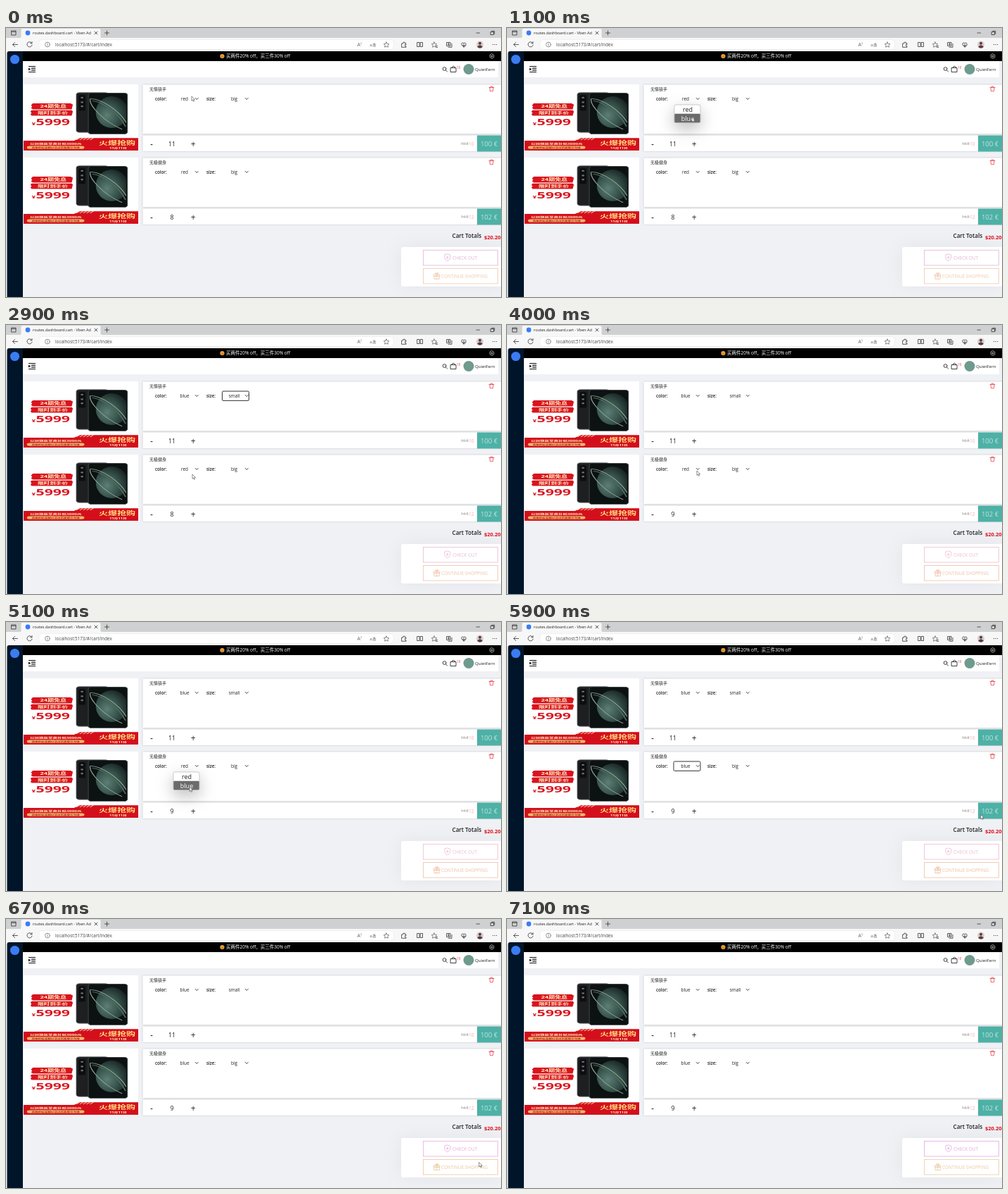
An HTML page for the animation above (7.4 s loop, 704 by 382 pixels).

```html
<!DOCTYPE html>
<html lang="zh-CN">
<head>
<meta charset="utf-8">
<title>Cart</title>
<style>
  html, body { margin: 0; width: 100%; height: 100%; overflow: hidden; }
  svg { display: block; width: 704px; height: 382px; }
  text { font: 6.4px "Open Sans", "Noto Sans CJK SC", "Noto Sans CJK", sans-serif; fill: #222; white-space: pre; }
  .mid { text-anchor: middle; }
  .bold { font-weight: 600; font-size: 6.2px; }
  .count { font-size: 8.8px; }
  .old { font-size: 5.4px; fill: #999; text-decoration: line-through; }
  .new { font-size: 6.6px; fill: #f4a9a9; }
  .price { font-size: 9.5px; font-weight: 300; fill: #fff; }
  .line { fill: none; stroke: #333; stroke-width: .8; stroke-linecap: round; stroke-linejoin: round; }
  .card { fill: #fff; filter: drop-shadow(0 .6px .8px #0003); }
  .ad text { font-weight: 700; fill: #fff0c0; }
  #menu text { font-size: 9px; }
  #panel { fill: #fff; filter: drop-shadow(0 8px 11px #0004); }
</style>
</head>
<body>
<svg viewBox="0 0 704 382">
  <defs>
    <radialGradient id="planet" cx=".35" cy=".6" r=".7">
      <stop offset="0" stop-color="#5d7f74"/>
      <stop offset=".5" stop-color="#38544e"/>
      <stop offset="1" stop-color="#16211f"/>
    </radialGradient>
    <clipPath id="screen"><rect x="57.5" y="14" width="32" height="60" rx="2"/></clipPath>
    <!-- Banner drawn on a 100 x 100 square, shown squashed as in the shop layout -->
    <g id="ad" class="ad" transform="translate(25 80) scale(1.63 .94)">
      <path fill="#fff" d="M0 0h100v100H0z"/>
      <rect x="46" y="12.5" width="28" height="60" rx="3" fill="#1d1f21" stroke="#66696b" stroke-width=".6"/>
      <rect x="48" y="16" width="6" height="24" rx="2" fill="#0d0e10"/>
      <path fill="none" stroke="#6d7276" stroke-width="2.4" stroke-linecap="round" d="M51 20v.1m0 7v.1m0 6v.1"/>
      <rect x="56.5" y="13" width="34" height="62" rx="3" fill="#0c1112" stroke="#3b4044" stroke-width=".7"/>
      <g clip-path="url(#screen)">
        <ellipse cx="77" cy="42" rx="14" ry="24" fill="url(#planet)"/>
        <path fill="none" stroke="#8fa88f" stroke-width=".8" d="M58 22C66 20 86 40 92 66M58 22C57 32 70 56 86 68"/>
        <path fill="none" stroke="#4c6a5c" stroke-width="1.2" d="M60 25C67 25 83 42 89 64"/>
      </g>
      <path fill="#d9141e" d="M8 28.7h33l2 2-1 7H8l-1.5-2 1-2-1-2zM7 39h35l1 2-1 6.3H7l-1-2 1-2-1-2z"/>
      <text class="mid" x="26" y="35.5" style="font-size:5.6px">24期免息</text>
      <text class="mid" x="25.5" y="45.2" style="font-size:5.3px">限时到手价</text>
      <text x="7" y="62" style="font-size:6px;fill:#d9141e">¥</text>
      <text x="10.8" y="62" style="font-size:13px;fill:#d9141e">5999</text>
      <path fill="#d40f1c" d="M0 85h44l5-4h51v19H0z"/>
      <path fill="none" stroke="#f5c8a8" stroke-width=".8" d="M46 84l3-3m0 3l3-3m0 3l3-3m0 3l3-3m0 3l3-3"/>
      <text x="5.5" y="91.6" style="font-size:4px">以旧换新至高补贴3000元</text>
      <rect x="3" y="93" width="50" height="4.6" rx="2" fill="#f0b56a"/>
      <text class="mid" x="28" y="96.4" style="font-size:2.8px;fill:#9d1a12">具体补贴金额以活动页面展示为准</text>
      <text x="65.6" y="91.3" style="font-size:8px;fill:#ffdc80">火爆抢购</text>
      <text x="74.8" y="97.6" style="font-size:3.6px">11月11日</text>
    </g>
    <g id="row">
      <use href="#ad"/>
      <path class="card" d="M194.5 80.5H704V150H194.5z"/>
      <path class="card" d="M194.5 152.5H704v22.500H194.5z"/>
      <path fill="#4eb1a6" d="M670 152.5h34v23h-34z"/>
      <text class="bold" x="212" y="103.2">color:</text>
      <text class="bold" x="285" y="103.2">size:</text>
      <path class="line" style="stroke:#111" d="M269.3 99.5l2 2 2-2M340.3 99.5l2 2 2-2"/>
      <path class="line" style="stroke:#e2444d" d="M687 84.5h7M689 84.3v-1.2h3v1.2M688 84.8l.5 5h4l.5-5"/>
      <text class="mid" x="207" y="168.6" style="font-size:11px;font-weight:600">-</text>
      <text class="mid" x="266.3" y="169.2" style="font-size:12px">+</text>
    </g>
  </defs>

  <!-- Browser -->
  <path fill="#f7f7f8" d="M0 0h704v382H0z"/>
  <path fill="#cfd0d1" d="M0 0h704v14H0z"/>
  <path fill="#f7f7f8" d="M20 14c1 0 1.5-1 1.5-2V3q0-2 2-2h109q2 0 2 2v9c0 1 .5 2 1.5 2z"/>
  <rect x="47" y="16.5" width="504" height="14" rx="4" fill="#fff" stroke="#e4e4e4" stroke-width=".5"/>
  <circle cx="31" cy="7" r="3.4" fill="#3b7cf5"/>
  <text x="38" y="9.2" style="font-size:5.5px">routes.dashboard.cart - Vben Ad</text>
  <text x="70" y="25.9" style="font-size:6.3px;fill:#444">localhost:5173/#/cart/index</text>
  <g class="line">
    <path d="M8 4h6v6H8zM8 5.3h6M126 5l4 4m0-4l-4 4M143.5 4v6m-3-3h6M669 7h4.5M689.5 5.5h4v4h-4zM690.7 4.3h4v4"/>
    <path d="M16.5 23.5h-7m3-3l-3 3 3 3M36.7 21.5a3.6 3.6 0 1 0 .4 2.6M37 19.5v2.3h-2.3"/>
    <circle cx="59" cy="23.5" r="3.4" stroke="#777"/>
    <path stroke="#777" d="M59 23v2m0-3.4v.1"/>
    <path id="star" stroke="#666" d="M541 20l1.2 2.4 2.6.4-1.9 1.8.5 2.6-2.4-1.2-2.4 1.2.5-2.6-1.9-1.8 2.6-.4z"/>
    <use href="#star" x="68"/>
    <path d="M611.5 25.5h2m-1.5 2h1.5M563 22h1.8a1.4 1.4 0 1 1 2.6 0h1.6v1.5a1.2 1.2 0 1 0 0 2.2v1.6h-6z"/>
    <path d="M585 20.5h3v6h-3zM589.5 20.5h3v6h-3zM627 20.5h5v5h-5zM629 27.3h5v-5M629.5 21.6v2.8m-1.4-1.4h2.8"/>
    <path d="M651 27l-3-3c-1-3 2-4 3-2 1-2 4-1 3 2zM651 23v4m-1.5-2h4"/>
  </g>
  <text x="499.5" y="25.8" style="font-size:7px;fill:#666">A<tspan dy="-2" style="font-size:4px">》</tspan></text>
  <text class="mid" x="522" y="25.6" style="font-size:6px;fill:#666">aあ</text>
  <circle cx="674" cy="23.5" r="5" fill="#d5cfcd"/>
  <path fill="#5b3a3b" d="M670 26.7q4-5 8 0-4 4-8 0z"/>
  <circle cx="674" cy="21.8" r="2" fill="#5b3a3b"/>
  <path class="line" style="stroke-width:1.2" d="M692.5 23.5h.1m2.4 0h.1m2.4 0h.1"/>

  <!-- Page frame -->
  <path fill="#eff1f5" d="M1 33h703v349H1z"/>
  <path fill="#001529" d="M1.5 382V36q0-3 3-3H24v349z"/>
  <path d="M24 33h680v14H24z"/>
  <path fill="#fff" d="M24 47h676v23H24z"/>
  <circle cx="12.5" cy="44.5" r="6.6" fill="#3b7cf5"/>
  <circle cx="307.5" cy="40" r="3.1" fill="#f2a33a"/>
  <path fill="none" stroke="#7a3c12" stroke-width=".7" d="M306 39h.6m1.8 0h.6m-3 1.8q1.5 1.3 3 0"/>
  <text x="313" y="42.4" style="font-size:6.5px;fill:#fff">买两件20% off，买三件30% off</text>
  <path class="line" style="stroke:#ddd;stroke-width:.7" d="M691 36.8l2.8 1.6v3.2l-2.8 1.6-2.8-1.6v-3.2zM690 40a1 1 0 1 0 2 0 1 1 0 1 0-2 0"/>
  <path class="line" style="stroke:#111;stroke-width:1.2" d="M32.5 54.5h9M36.5 57.2h5M36.5 59.8h5M32.5 62.5h9"/>
  <path d="M32 56.5l3 2-3 2z"/>
  <path class="line" style="stroke:#111" d="M626 58a2.4 2.4 0 1 1-4.8 0 2.4 2.4 0 0 1 4.8 0M625.4 59.8l2.2 2.2M632.5 56.5h7.5v6h-7.5zM634.4 56.3q0-2 1.9-2t1.9 2"/>
  <text x="641" y="57.8" style="font-size:4.6px;fill:#e33">10</text>
  <circle cx="658" cy="58.5" r="7.5" fill="#6f9a8e"/>
  <text x="667" y="61" style="font-size:6.1px">QuietFern</text>

  <!-- Cart rows -->
  <use href="#row"/>
  <use href="#row" y="104"/>
  <text x="204" y="89.2" style="font-size:6px">无情铁手</text>
  <text x="204" y="193.2" style="font-size:6px">无极健身</text>
  <text class="mid" x="254" y="103.2" id="color1"></text>
  <text class="mid" x="324.6" y="103.2" id="size1"></text>
  <text class="mid" x="254" y="207.2" id="color2"></text>
  <text class="mid" x="324.6" y="207.2">big</text>
  <text class="mid count" x="236" y="168">11</text>
  <text class="mid count" x="236" y="271.6" id="count"></text>
  <text class="old" x="647" y="166.3">10.5</text><text class="new" x="658" y="166.8">10</text>
  <text class="old" x="647" y="270.1">14.5</text><text class="new" x="658" y="270.6">12</text>
  <text class="price mid" x="687" y="168">100 €</text>
  <text class="price mid" x="687" y="272">102 €</text>

  <!-- Totals -->
  <text x="634.5" y="298" style="font-size:8.1px;font-weight:600">Cart Totals</text>
  <text x="680" y="299.8" style="font-size:7.5px;font-weight:700;fill:#e0101c">$20.20</text>
  <path fill="#fff" style="filter:drop-shadow(0 0 12px #0000000d)" d="M565 311h139v56H565q-3 0-3-3v-50q0-3 3-3z"/>
  <g id="checkout">
    <rect x="593.5" y="315.5" width="106" height="21.5" stroke="currentColor" stroke-width=".8"/>
    <path class="line" style="stroke:currentColor" d="M627.8 321l4 1.3v3.8q-.4 3-4 4.8-3.6-1.8-4-4.8v-3.8zM627.8 324v3.6m-1.5-1.8h3"/>
    <text x="635" y="328.9" style="fill:currentColor">CHECK OUT</text>
  </g>
  <g id="shopping">
    <rect x="593.5" y="341.5" width="106" height="21.5" fill="none" stroke="currentColor" stroke-width=".8"/>
    <path class="line" style="stroke:currentColor" d="M608.5 350h8.5v2.2h-8.5zM609.3 352.2h7v4.3h-7zM612.8 350v6.5M612.8 349.8q-3.5-.3-2-2t2 2q.5-3.5 2-2t-2 2"/>
    <text x="619" y="354.5" style="fill:currentColor">CONTINUE SHOPPING</text>
  </g>

  <rect id="focus" width="38" height="13.4" rx="1.5" fill="none" stroke="#333"/>
  <g id="menu">
    <rect id="panel" width="37" height="25.5" rx="2" stroke="#999" stroke-width=".5"/>
    <rect id="mark" x=".3" width="36.4" height="12.6" rx="1" fill="#6b6b6b"/>
    <text class="mid" x="19" y="10.3"></text>
    <text class="mid" x="19" y="23"></text>
  </g>
  <g id="pointer" fill="#fff" stroke="#444" stroke-width=".6" stroke-linejoin="round">
    <path id="arrow" d="M0 0v6.4l1.5-1.3 1 2.200 1.100-.4-1-2.200h2z"/>
    <path id="hand" d="M0 .6q.8-1.200 1.400 0v2.700l3 .7q.7.3.5 1.300l-.6 2.700H.7L-1.400 5q0-1.200 1.400 0z"/>
  </g>
</svg>
<script>
const LOOP = 7400, STEP = 100;
const $ = id => document.getElementById(id);

// time, x, y of the pointer tip
const path = [
  [0, 264, 97], [200, 263, 99], [400, 264, 102], [1100, 263, 127], [1200, 263, 127],
  [1600, 338, 98], [1800, 340, 102], [2000, 344, 114], [2200, 343, 127], [2300, 343, 127],
  [2900, 265, 212], [3200, 265, 265], [3900, 267, 267], [4000, 270, 207], [4600, 270, 207],
  [5100, 261, 234], [5200, 261, 234], [5500, 677, 245], [5700, 677, 245], [6300, 667, 330],
  [6600, 667, 330], [7000, 690, 392], [LOOP, 690, 392]
];
const menus = [
  { from: 400, to: 1300, next: 800, x: 238, y: 109, items: ['red', 'blue'] },
  { from: 1800, to: 2400, next: 2100, x: 308, y: 109, items: ['big', 'small'] },
  { from: 4400, to: 5300, next: 4900, x: 238, y: 213, items: ['red', 'blue'] }
];
const focuses = [
  { from: 1300, to: 1800, x: 237, y: 94 },
  { from: 2400, to: 3200, x: 307.5, y: 94 },
  { from: 5300, to: 6600, x: 237, y: 198 }
];
const tints = {
  checkout: [[0, 225, 180, 214], [2400, 225, 180, 214], [3200, 240, 188, 206], [5800, 240, 188, 206], [7100, 228, 165, 228], [LOOP, 228, 165, 228]],
  shopping: [[0, 240, 200, 172], [2400, 240, 200, 172], [3200, 241, 190, 165], [5800, 241, 190, 165], [6300, 232, 196, 145], [LOOP, 236, 204, 165]]
};

// Linear blend through a list of [time, ...values]
function sample(keys, t) {
  const i = keys.findIndex(k => k[0] > t), a = keys[i - 1], b = keys[i];
  const p = (t - a[0]) / (b[0] - a[0]);
  return a.slice(1).map((v, n) => v + (b[n + 1] - v) * p);
}
const during = (t, from, to) => t >= from && t < to;
const show = (el, on) => el.setAttribute('visibility', on ? 'visible' : 'hidden');
const place = (el, x, y) => el.setAttribute('transform', `translate(${x} ${y})`);

// Show a part at whichever of its spans is active
function activate(el, spans, t) {
  const span = spans.find(s => during(t, s.from, s.to));
  show(el, span);
  if (span) place(el, span.x, span.y);
  return span;
}

function draw(t) {
  $('color1').textContent = t < 1300 ? 'red' : 'blue';
  $('size1').textContent = t < 2400 ? 'big' : 'small';
  $('color2').textContent = t < 5300 ? 'red' : 'blue';
  $('count').textContent = t < 3300 ? 8 : 9;

  activate($('focus'), focuses, t);
  const menu = activate($('menu'), menus, t);
  if (menu) {
    const picked = t < menu.next ? 0 : 1;
    $('mark').setAttribute('y', picked ? 12.7 : .3);
    $('menu').querySelectorAll('text').forEach((el, i) => {
      el.textContent = menu.items[i];
      el.style.fill = i === picked ? '#fff' : '#222';
    });
  }

  for (const id in tints) $(id).style.color = `rgb(${sample(tints[id], t)})`;
  const hover = during(t, 6100, 6700);
  $('checkout').firstElementChild.setAttribute('fill', hover ? '#a7a6aa' : 'none');

  place($('pointer'), ...sample(path, t));
  const link = hover || during(t, 3200, 4000);
  show($('arrow'), !link);
  show($('hand'), link);
}

function tick() {
  draw(Math.floor(performance.now() % LOOP / STEP) * STEP);
  requestAnimationFrame(tick);
}
tick();
</script>
</body>
</html>
```
